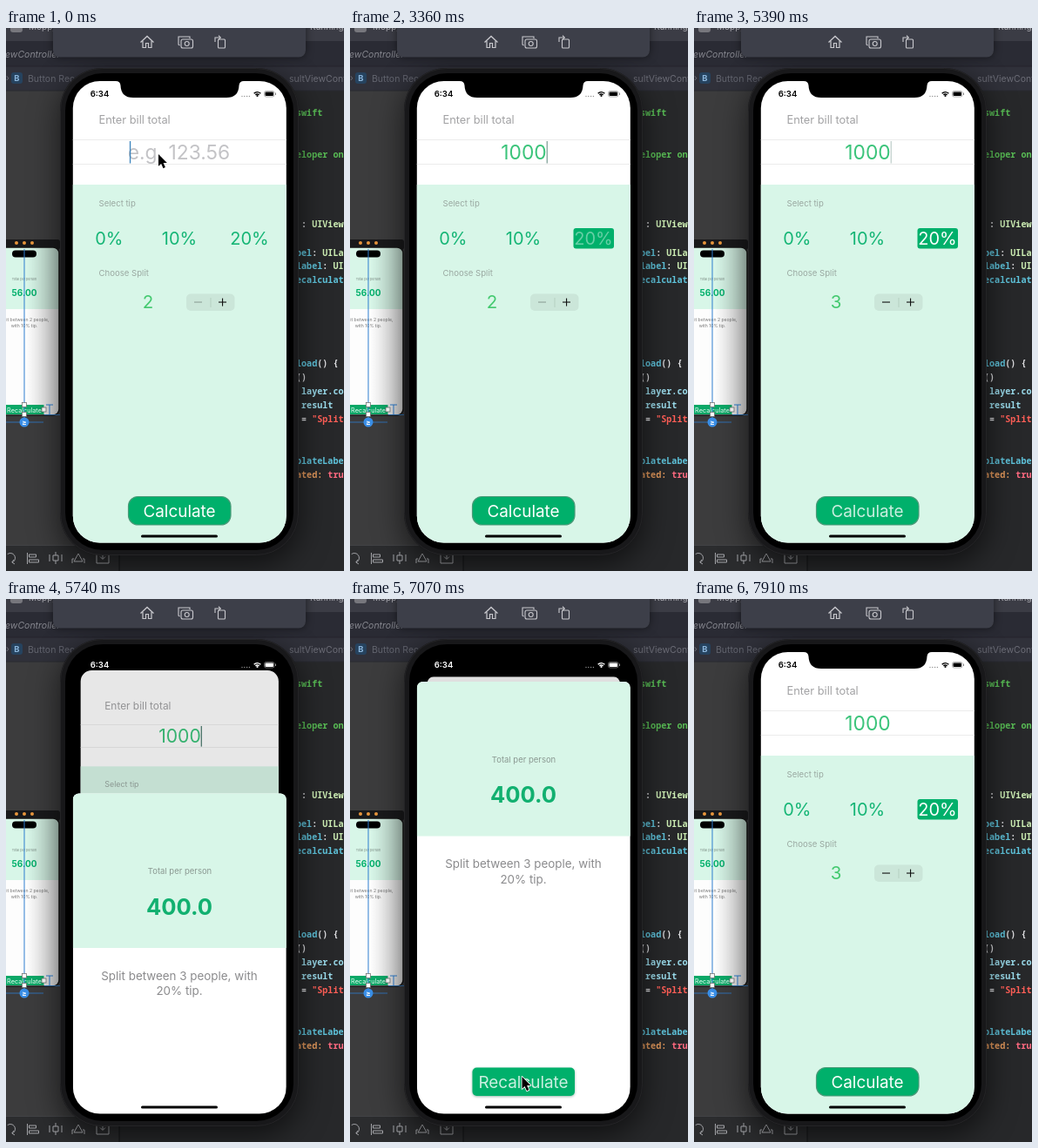
These frames come from a looping animation (388x624 px, 8000 ms). An HTML page with a canvas:

```html
<!DOCTYPE html>
<html lang="en">
<head>
<meta charset="utf-8">
<title>Bill splitter demo</title>
<style>
html, body { margin: 0; width: 100%; height: 100%; overflow: hidden; background: #27282a; }
canvas { display: block; width: 388px; height: 624px; }
</style>
</head>
<body>
<canvas id="stage"></canvas>
<script>
const W = 388, H = 624, LOOP = 8000, STEP = 70;
const GREEN = '#00b06b', MINT = '#d8f6e8', BLUE = '#2f7fd0';
const SANS = 'Inter, "Open Sans", sans-serif';
const MONO = '"Noto Sans Mono", "DejaVu Sans Mono", monospace';

const canvas = document.getElementById('stage');
const dpr = window.devicePixelRatio || 1;
canvas.width = W * dpr;
canvas.height = H * dpr;
const g = canvas.getContext('2d');

const lerp = (a, b, k) => a + (b - a) * k;
const ramp = (t, a, b) => Math.min(1, Math.max(0, (t - a) / (b - a)));

// Remaining distance of a critically damped spring, 1 down to 0
function spring(ms) {
  if (ms <= 0) return 1;
  const k = ms * 0.0147;
  return (1 + k) * Math.exp(-k);
}

function rect(x, y, w, h, fill) {
  g.fillStyle = fill;
  g.fillRect(x, y, w, h);
}

function round(x, y, w, h, r, fill, stroke, lw = 1) {
  g.beginPath();
  g.roundRect(x, y, w, h, r);
  if (fill) { g.fillStyle = fill; g.fill(); }
  if (stroke) { g.strokeStyle = stroke; g.lineWidth = lw; g.stroke(); }
}

function disc(x, y, r, fill) {
  g.beginPath();
  g.arc(x, y, r, 0, Math.PI * 2);
  g.fillStyle = fill;
  g.fill();
}

function line(points, color, lw = 1) {
  g.beginPath();
  points.forEach(([x, y], i) => i ? g.lineTo(x, y) : g.moveTo(x, y));
  g.strokeStyle = color;
  g.lineWidth = lw;
  g.stroke();
}

function text(str, x, y, size, color, { align = 'left', weight = 400, font = SANS, style = '' } = {}) {
  g.font = `${style} ${weight} ${size}px ${font}`;
  g.textAlign = align;
  g.fillStyle = color;
  g.fillText(str, x, y);
}

function withAlpha(a, draw) {
  g.save();
  g.globalAlpha *= a;
  draw();
  g.restore();
}

const CENTER = { align: 'center' };

/* ---------- desktop behind the phone ---------- */

// Each row: baseline, then [column, text, colour] runs
const CYAN = '#5fc4dc', PALE = '#9bdcec', TYPE = '#cdeeb4', PLAIN = '#dfdfe2';
const STRING = '#ff5f57', COMMENT = '#59bd55';
const CODE = [
  [101, [-1, '.swift', COMMENT]],
  [149, [0, 'eloper on', COMMENT]],
  [229, [1, ':', PLAIN], [3, 'UIView', TYPE]],
  [262, [0, 'bel', CYAN], [3, ':', PLAIN], [5, 'UILa', TYPE]],
  [277, [0, 'label', CYAN], [5, ':', PLAIN], [7, 'UI', TYPE]],
  [293, [0, 'ecalculat', CYAN]],
  [389, [0, 'load', CYAN], [4, '() {', PLAIN]],
  [405, [0, '()', PLAIN]],
  [421, [1, 'layer.co', PALE]],
  [437, [1, 'result', PALE]],
  [453, [1, '=', PLAIN], [3, '"Split', STRING]],
  [501, [0, 'plateLabe', CYAN]],
  [517, [0, 'ated:', '#e59a5c'], [6, 'tru', '#ff6a80']]
];

function drawEditor() {
  rect(0, 0, W, H, '#27282a');
  rect(0, 72, 130, 522, '#3c3c3d');
  rect(0, 0, W, 15, '#3b3c45');
  rect(0, 15, W, 29, '#2a2b34');
  rect(0, 44, W, 28, '#30313a');
  rect(0, 43.5, W, 1, '#24252c');
  rect(0, 71.5, W, 1, '#292a30');

  round(5, -8, 14, 13, 3, '#77777d');
  text('Moppy', 26, 2, 10, '#a9a9af');
  text('Running', 349, 2, 10, '#a9a9af');
  text('ewController', -1, 34, 10.5, '#85868e', { style: 'italic' });
  text('›', 0, 61, 10, '#70717a');
  round(6, 51, 13, 13, 3, '#26435f');
  text('B', 12.5, 61, 9.5, '#8ab4da', { align: 'center', weight: 700 });
  text('Button Recalculate', 25, 62, 10.5, '#62646e');
  text('sultViewController', 325, 62, 10.5, '#6b6c76');

  for (const [y, ...runs] of CODE)
    for (const [col, str, color] of runs)
      text(str, 333 + col * 6.06, y, 10.1, color, { font: MONO, weight: 600 });
}

function drawScene() {
  round(-40, 243, 102, 12, 3, '#19191b');
  for (const x of [12, 21, 30]) disc(x, 247, 2, '#e8963c');

  g.save();
  g.beginPath();
  g.roundRect(-40, 252, 101, 193, 7);
  g.clip();
  rect(0, 252, 62, 193, '#fdfdfd');
  rect(0, 252, 62, 71, MINT);
  text('Total per person', 21, 290, 3.7, '#7b8a83', CENTER);
  text('56.00', 21, 308, 10, GREEN, { align: 'center', weight: 700 });
  text('Split between 2 people,', 21, 337, 5.1, '#777', CENTER);
  text('with 10% tip.', 21, 343.5, 5.1, '#777', CENTER);
  const shade = g.createLinearGradient(24, 0, 62, 0);
  shade.addColorStop(0, 'rgba(0,0,0,0)');
  shade.addColorStop(1, 'rgba(0,0,0,.16)');
  rect(0, 252, 62, 193, shade);
  g.restore();
  round(-40, 252, 101, 193, 7, null, '#161616', 1.5);

  round(7, 255.5, 28, 8, 4, '#000');
  rect(0, 433, 43.5, 11, '#0ba867');
  text('Recalculate', 21, 441.5, 7.3, '#e9fff5', CENTER);
  line([[21, 254], [21, 458]], BLUE);
  line([[0, 453], [43, 453]], BLUE, .8);
  line([[44, 444.5], [62, 444.5]], BLUE, .8);
  line([[46, 433], [54, 433]], BLUE);
  line([[50, 433], [50, 444]], BLUE);
  for (const [x, y] of [[21, 433], [43.5, 438.5], [21, 444]]) {
    rect(x - 2.5, y - 2.5, 5, 5, '#fff');
    g.strokeStyle = '#666';
    g.lineWidth = .7;
    g.strokeRect(x - 2.5, y - 2.5, 5, 5);
  }
  disc(21, 453, 5.5, '#3a8ee6');
  text('≥', 21, 456, 8, '#fff', { align: 'center', weight: 700 });
}

function drawBottomBar() {
  rect(0, 594, 130, 30, '#2b2c2e');
  rect(0, 594, 130, 1, '#424346');
  rect(129.5, 594, 1, 30, '#141416');
  const c = '#a4a5a9';
  g.beginPath();
  g.arc(5, 609, 5.5, -2.2, 1.2);
  g.strokeStyle = c;
  g.lineWidth = 1;
  g.stroke();
  line([[9, 611], [6.8, 614], [10, 616]], c);
  line([[24.5, 603], [24.5, 616]], c);
  round(26.5, 605, 8, 3, 0, null, c);
  round(26.5, 611, 11, 3, 0, null, c);
  round(54, 606, 6, 6, 0, null, c);
  line([[50, 605], [50, 613]], c);
  line([[64, 605], [64, 613]], c);
  line([[57, 602], [57, 606]], c);
  line([[57, 612], [57, 616]], c);
  line([[83, 604], [88, 613], [78, 613], [83, 604]], c);
  line([[76, 615], [76, 610], [78, 610]], c);
  line([[90, 615], [90, 610], [88, 610]], c);
  line([[108, 603], [104, 603], [104, 615], [118, 615], [118, 603], [114, 603]], c);
  line([[111, 601], [111, 610]], c);
  line([[108, 607.5], [111, 610.5], [114, 607.5]], c);
}

function drawToolbar() {
  g.save();
  g.shadowColor = 'rgba(0,0,0,.5)';
  g.shadowBlur = 10 * dpr;
  round(54, -20, 290, 53.5, 8, '#3d3f49');
  g.restore();
  const c = '#c9c9ce';
  line([[154.5, 16.5], [162, 9.5], [169.5, 16.5]], c, 1.3);
  line([[157, 15], [157, 22.5], [160.5, 22.5], [160.5, 17.5], [163.5, 17.5], [163.5, 22.5], [167, 22.5], [167, 15]], c, 1.2);
  line([[199.5, 20], [198, 19], [198, 10], [211, 10], [211, 12]], c, 1.1);
  round(201, 13, 13.5, 10, 2, '#3d3f49', c, 1.1);
  g.beginPath();
  g.arc(207.7, 18, 2.5, 0, 7);
  g.stroke();
  round(243.5, 13, 8, 10, 1, null, c, 1.1);
  line([[240, 16], [240, 11], [246, 11]], c, 1.1);
  line([[244, 8.7], [246.3, 11], [244, 13.3]], c, 1.1);
}

function drawBody() {
  g.save();
  g.shadowColor = 'rgba(0,0,0,.6)';
  g.shadowBlur = 34 * dpr;
  g.shadowOffsetY = 10 * dpr;
  round(62, 46, 274, 560, 48, '#18181a');
  g.restore();
  round(62.5, 46.5, 273, 559, 48, null, '#242426');
  round(68, 52, 262, 548, 43, '#000');
}

/* ---------- app ---------- */

function bill(t) {
  return t < 350 ? '' : t < 840 ? '1' : t < 1050 ? '10' : t < 1330 ? '100' : '1000';
}

function caretAlpha(t) {
  if (t < 1890) return 1;
  if (t >= 5600) return t < 7840 ? 1 : t < 7910 ? .35 : 0;
  const phase = (t - 1890) % 1050;
  if (phase < 70) return .6;
  return ramp(phase, 280, 490);
}

// Button title opacity: dips on touch, then recovers
const press = (t, at) => t < at ? 1 : t < at + 70 ? .8 : .35;

function drawField(t) {
  const str = bill(t);
  let x = 142.5;
  if (str) {
    text(str, 199.5, 151, 22.8, '#3cc47b', CENTER);
    x = 200 + g.measureText(str).width / 2;
  } else {
    text('e.g. 123.56', 198.5, 151, 22.8, '#c3c3c6', CENTER);
  }
  withAlpha(caretAlpha(t), () => rect(x - .6, 130, 1.3, 25.5, str ? '#46766a' : '#3a84bd'));
}

function drawTips(t) {
  text('0%', 118.3, 249, 20, '#14b575', CENTER);
  text('10%', 199, 249, 20, '#14b575', CENTER);
  const on = t >= 3290;
  if (on) round(256.5, 230, 46.5, 23.5, 3, GREEN);
  const a = t < 3220 ? 1 : lerp(.4, 1, ramp(t, 3360, 3780));
  withAlpha(a, () => text('20%', 279.5, 249, 20, on ? '#fff' : '#14b575', CENTER));
}

function drawSplit(t) {
  const three = t >= 4060;
  text(three ? '3' : '2', 163, 322, 20.5, '#43c96f', CENTER);
  round(207, 305.5, 55.5, 19.5, 5, '#cbe6d9');
  if (three) {
    const a = .14 * (1 - ramp(t, 4060, 4340));
    round(235, 305.5, 27.5, 19.5, [0, 5, 5, 0], `rgba(0,0,0,${a})`);
  }
  rect(234.5, 310, 1, 11, '#b5cfc2');
  rect(216, 314.5, 9, 1.1, three ? '#111' : '#8ea197');
  rect(244, 314.5, 9, 1.1, '#111');
  rect(248, 310.6, 1.1, 9, '#111');
}

function drawForm(t) {
  rect(76, 61, 247, 531, '#fff');
  rect(76, 180, 247, 412, MINT);
  text('Enter bill total', 106.5, 109.5, 12.8, '#a2a2a4');
  rect(76, 128, 247, 1, '#ececec');
  rect(76, 156, 247, 1, '#ececec');
  drawField(t);
  text('Select tip', 106.5, 205, 9.6, '#9aa8a1');
  drawTips(t);
  text('Choose Split', 106.5, 285, 9.6, '#9aa8a1');
  drawSplit(t);
  round(140.5, 538.5, 117.5, 32.5, 11, GREEN, '#4a9a78', 1.2);
  const a = t < 6500 ? press(t, 5390) : 1;
  withAlpha(a, () => text('Calculate', 199, 562, 18.9, '#fff', CENTER));
}

function drawResult(t) {
  round(76.8, 95, 245, 520, [7, 7, 0, 0], '#fff');
  round(76.8, 95, 245, 177.5, [7, 7, 0, 0], MINT);
  text('Total per person', 199.5, 187.5, 9.5, '#8b9992', CENTER);
  text('400.0', 199, 234, 25.6, '#12b070', { align: 'center', weight: 700 });
  text('Split between 3 people, with', 199, 309, 13.4, '#8b8b8d', CENTER);
  text('20% tip.', 199, 326.5, 13.4, '#8b8b8d', CENTER);
  g.save();
  g.shadowColor = 'rgba(0,80,50,.4)';
  g.shadowBlur = 3 * dpr;
  g.shadowOffsetY = dpr;
  round(140.5, 538.5, 117.5, 32.5, 5, GREEN);
  g.restore();
  withAlpha(press(t, 7070), () => text('Recalculate', 199, 562, 18.9, '#fff', CENTER));
}

function drawStatus(p) {
  const v = Math.round(255 * ramp(p, .2, .7));
  const c = `rgb(${v},${v},${v})`;
  text('6:34', 107.5, 79, 9.6, c, { align: 'center', weight: 600 });
  for (let i = 0; i < 4; i++) disc(271 + i * 2.8, 78.5, .7, '#909090');
  g.strokeStyle = c;
  g.lineWidth = 1.4;
  for (const r of [2.8, 5.2]) {
    g.beginPath();
    g.arc(288.5, 78.8, r, -2.4, -.74);
    g.stroke();
  }
  disc(288.5, 78, 1.1, c);
  round(296.5, 72.5, 11.5, 6.5, 2, null, '#909090', .7);
  round(297.5, 73.5, 9.5, 4.5, 1, c);
  rect(309, 74.5, 1, 2.5, '#909090');
}

function drawNotch() {
  g.beginPath();
  g.moveTo(126, 60);
  g.lineTo(126, 61);
  g.quadraticCurveTo(131, 61, 131.5, 66);
  g.quadraticCurveTo(132, 80, 146, 80);
  g.lineTo(253, 80);
  g.quadraticCurveTo(267, 80, 267.5, 66);
  g.quadraticCurveTo(268, 61, 273, 61);
  g.lineTo(273, 60);
  g.fillStyle = '#000';
  g.fill();
}

function drawScreen(t) {
  let p = (1 - spring(t - 5560)) * spring(t - 7250);
  if (p < .002) p = 0;
  g.save();
  g.beginPath();
  g.roundRect(76.8, 61, 245, 530.6, 31);
  g.clip();
  rect(76, 61, 247, 531, '#000');

  g.save();
  const s = lerp(1, .902, p);
  g.translate(199.25, lerp(61, 89.3, p));
  g.scale(s, s);
  g.translate(-199.25, -61);
  if (p) {
    g.beginPath();
    g.roundRect(76.8, 61, 245, 531, lerp(30, 8, p));
    g.clip();
  }
  drawForm(t);
  if (p) rect(76, 61, 247, 531, `rgba(0,0,0,${.125 * p})`);
  g.restore();

  if (p) {
    g.save();
    g.translate(0, 497 * (1 - p));
    drawResult(t);
    g.restore();
  }
  drawStatus(p);
  drawNotch();
  round(155, 582.5, 88, 3, 1.5, '#000');
  g.restore();
}

function drawPointer(x, y) {
  g.save();
  g.translate(x, y);
  g.scale(.95, .95);
  g.beginPath();
  [[0, 0], [0, 14.5], [3.3, 11.5], [5.8, 17], [8.3, 15.9], [5.9, 10.6], [10.4, 10.4]]
    .forEach(([a, b]) => g.lineTo(a, b));
  g.closePath();
  g.lineJoin = 'round';
  g.strokeStyle = '#fff';
  g.lineWidth = 1.8;
  g.stroke();
  g.fillStyle = '#000';
  g.fill();
  g.restore();
}

function draw(t) {
  g.setTransform(dpr, 0, 0, dpr, 0, 0);
  drawEditor();
  drawScene();
  drawBottomBar();
  drawBody();
  drawToolbar();
  drawScreen(t);
  if (t < 2660) drawPointer(175, 145);
  else if (t >= 7070 && t < 7420) drawPointer(197.5, 549);
}

const start = performance.now();
function tick() {
  const t = (performance.now() - start) % LOOP;
  draw(Math.floor(t / STEP) * STEP);
  requestAnimationFrame(tick);
}
tick();
</script>
</body>
</html>
```
